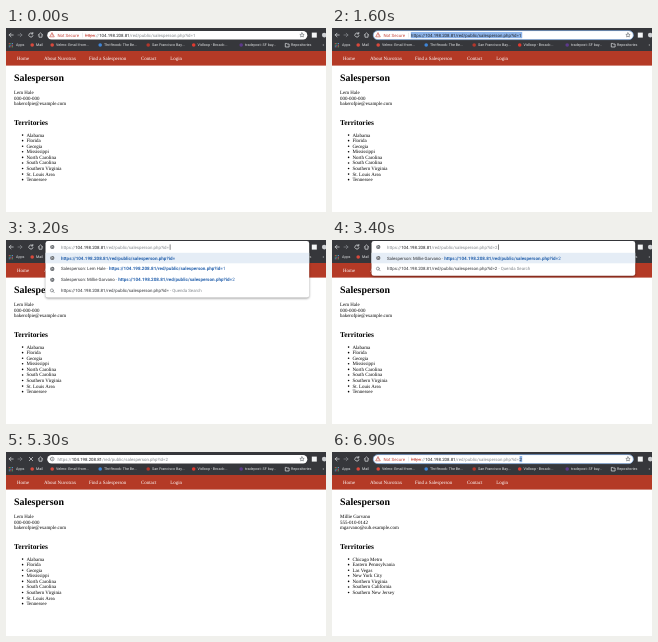
These frames come from a looping animation (320 by 184 pixels, 8 s). An HTML page:

```html
<!DOCTYPE html>
<html lang="en">
<head>
<meta charset="utf-8">
<title>Salesperson</title>
<style>
html, body { margin: 0; width: 100%; height: 100%; overflow: hidden; background: #fff; }
svg { display: block; width: 100vw; height: 100vh; text-rendering: geometricPrecision; }
.ui { font-family: Roboto, sans-serif; font-size: 4.37px; }
.marks { font-size: 3.7px; fill: #e2e4e6; }
.page { font-family: "Liberation Serif", serif; font-size: 4.95px; }
.page .h1 { font-size: 9.9px; font-weight: 700; }
.page .h2 { font-size: 7.42px; font-weight: 700; }
.icon { fill: none; stroke: #d6d8db; stroke-width: .75; stroke-linecap: round; stroke-linejoin: round; }
.dim { stroke: #808388; }
.dark { stroke: #5f6368; stroke-width: .6; }
.danger { stroke: #c5453a; stroke-width: .6; }

/* address colours */
.scheme, .rest { fill: #80868b; }
.host { fill: #202124; }
.warn .scheme, .alert { fill: #c5453a; }
.warn .scheme { text-decoration: line-through; }
.chosen tspan { fill: #202124; }
.row { fill: #303236; }
.row .note { fill: #80868b; }
.link { fill: #2662ad; font-weight: 700; font-size: 4.55px; }
.link .last { font-weight: 400; }
.panel { filter: drop-shadow(0 1px 1.2px rgba(0, 0, 0, .4)); }

/* timeline: 1% is 80 ms */
[class*="t-"] { animation: 8s step-end infinite; }
.t-first { animation-name: first; }
.t-wait { animation-name: wait; }
.t-second { animation-name: second; }
.t-ring { animation-name: ring; }
.t-all1 { animation-name: all1; }
.t-all2 { animation-name: all2; }
.t-digit { animation-name: digit; }
.t-caret { animation-name: caret; }
.t-drop1 { animation-name: drop1; }
.t-drop2 { animation-name: drop2; }
.t-blink { animation-name: blink; }
.t-page1 { animation-name: page1; }
.t-reload { animation-name: reload; }
@keyframes first { 0% { visibility: visible } 40%, 100% { visibility: hidden } }
@keyframes wait { 0% { visibility: hidden } 66.25% { visibility: visible } 70%, 100% { visibility: hidden } }
@keyframes second { 0% { visibility: hidden } 70%, 100% { visibility: visible } }
@keyframes ring { 0%, 40% { visibility: hidden } 20%, 82.5%, 100% { visibility: visible } }
@keyframes all1 { 0% { visibility: hidden } 20% { visibility: visible } 30%, 100% { visibility: hidden } }
@keyframes all2 { 0% { visibility: hidden } 82.5% { visibility: visible } 86.25%, 100% { visibility: hidden } }
@keyframes digit { 0% { visibility: hidden } 86.25%, 100% { visibility: visible } }
@keyframes caret { 0% { visibility: hidden } 30% { visibility: visible } 36.25%, 100% { visibility: hidden } }
@keyframes drop1 { 0% { visibility: hidden } 40% { visibility: visible } 42.5%, 100% { visibility: hidden } }
@keyframes drop2 { 0% { visibility: hidden } 42.5% { visibility: visible } 66.25%, 100% { visibility: hidden } }
@keyframes blink { 0%, 47.5%, 60%, 100% { visibility: hidden } 42.5%, 53.75% { visibility: visible } }
@keyframes page1 { 0% { visibility: visible } 70%, 100% { visibility: hidden } }
@keyframes reload { 0%, 70%, 100% { visibility: visible } 66.25% { visibility: hidden } }
</style>
</head>
<body>
<svg id="stage" viewBox="0 0 320 184" preserveAspectRatio="none"></svg>
<script>
const text = (x, y, s, cls = '') => `<text x="${x}" y="${y}" class="${cls}">${s}</text>`;
const box = (x, y, w, h, fill, extra = '') =>
  `<rect x="${x}" y="${y}" width="${w}" height="${h}" fill="${fill}" ${extra}/>`;
const dot = (x, y, r, fill) => `<circle cx="${x}" cy="${y}" r="${r}" fill="${fill}"/>`;
const path = (d, cls = '') => `<path class="icon ${cls}" d="${d}"/>`;
const group = (cls, ...parts) => `<g class="${cls}">${parts.join('')}</g>`;

const HOST = '104.198.208.81';
const PATH = '/red/public/salesperson.php?id=';
const SELECTION = '#8db4ea';
const url = id => `<tspan class="scheme">https</tspan><tspan class="rest">://</tspan>` +
  `<tspan class="host">${HOST}</tspan><tspan class="rest">${PATH}${id}</tspan>`;
const link = id => `<tspan class="link">https://${HOST}${PATH}<tspan class="last">${id}</tspan></tspan>`;

const people = [
  {
    name: 'Lem Hale', phone: '000-000-000', mail: 'bakerofpie@example.com',
    areas: ['Alabama', 'Florida', 'Georgia', 'Mississippi', 'North Carolina', 'South Carolina',
      'Southern Virginia', 'St. Louis Area', 'Tennessee']
  },
  {
    name: 'Millie Garvano', phone: '555-010-0142', mail: 'mgarvano@sub.example.com',
    areas: ['Chicago Metro', 'Eastern Pennsylvania', 'Las Vegas', 'New York City',
      'Northern Virginia', 'Southern California', 'Southern New Jersey']
  }
];

const LINE = 5.57;
const details = p =>
  [p.name, p.phone, p.mail].map((s, i) => text(8, 66.3 + i * LINE, s)).join('') +
  p.areas.map((s, i) => {
    const y = 108.6 + i * LINE;
    return dot(16.6, y - 1.5, .8, '#000') + text(20.4, y, s);
  }).join('');

const page = group('page',
  box(0, 23, 320, 14.6, '#b43a26'),
  `<g fill="#fff">`,
  [[11, 'Home'], [38, 'About Nuvotrax'], [83, 'Find a Salesperson'], [135, 'Contact'], [164.3, 'Login']]
    .map(([x, s]) => text(x, 32, s)).join(''),
  `</g>`,
  text(8, 53.1, 'Salesperson', 'h1'),
  text(8, 97, 'Territories', 'h2'),
  group('t-page1', details(people[0])),
  group('t-second', details(people[1])));

const marks = [
  [10, 'Apps', ''], [30, 'Mail', '#d9493c'], [50, 'Velmo: Email from...', '#d9493c'],
  [98, 'Thriftnook: The Be...', '#3f86d8'], [146, 'San Francisco Bay...', '#b3372c'],
  [191.5, 'Vidloop - Broadc...', '#e03a30'], [239, 'tradepost: SF bay...', '#5d3a8c']
];
const apps = [0, 1, 2].map(i => [0, 1, 2].map(j =>
  box(2.8 + i * 1.6, 15.1 + j * 1.6, 1, 1, ['#d9584b', '#58a869', '#5a8fe0'][(i + j) % 3])).join('')).join('');

const chrome = group('ui',
  box(0, 0, 320, 23, '#36373b'),
  path('M7.2 7H3.2M5 5.2 3.2 7 5 8.8'),
  path('M12 7h4M14.2 5.2 16 7 14.2 8.8', 'dim'),
  group('t-reload', path('M26.6 5.7A2.1 2.1 0 1 0 27 7.6M26.8 4.4v1.5h-1.5')),
  group('t-wait', path('M23.3 5.3 26.7 8.7M26.7 5.3 23.3 8.7')),
  path('M32.2 7.1 34.5 4.9 36.8 7.1M33 6.8V9.2h3V6.8'),
  box(41.3, 2.9, 260, 8.5, '#fff', 'rx="4.25"'),
  path('M296 4.9l.65 1.4 1.5.2-1.1 1 .3 1.5-1.35-.7-1.35.7.3-1.5-1.1-1 1.5-.2z', 'dark'),
  box(305.8, 4.6, 5, 5, '#f4f5f6'),
  dot(318.2, 7.1, 2.3, '#d0d2d5'),
  group('marks', apps,
    marks.map(([x, s, c]) => (c && dot(x - 3.8, 17, 1.8, c)) + text(x, 18.3, s)).join(''),
    path('M279.3 18.6v-3.2h1.3l.5.6h2v2.6z'),
    text(285, 18.3, 'Repositories'),
    text(316.5, 18.3, '»')));

const insecure = (time, id) => group(time,
  path('M46.2 4.9 48.3 8.8h-4.2zM46.2 6.4v.9', 'danger'),
  text(51.5, 8.5, 'Not Secure', 'alert'),
  box(76, 4.8, .35, 4.6, '#c4c7ca'),
  text(79, 8.5, url(id), 'warn'));

const selected = (time, id) => group(time,
  box(78.8, 4, 111.4, 6.2, SELECTION),
  text(79, 8.5, url(id), 'chosen'));

const caret = x => box(x, 4.4, .55, 5.4, '#202124');

const address = group('ui',
  insecure('t-first', 1),
  group('t-wait',
    path('M44.3 7a1.9 1.9 0 1 0 3.8 0a1.9 1.9 0 1 0-3.8 0M46.2 6.9V8M46.2 5.9v.01', 'dark'),
    text(51.5, 8.5, url(2))),
  insecure('t-second', 2),
  group('t-ring', box(41.3, 2.6, 260, 9, 'none', 'rx="4.5" stroke="#86b0e6" stroke-width=".7"')),
  selected('t-all1', 1),
  selected('t-all2', 2),
  group('t-digit', box(187.6, 4, 2.6, 6.2, SELECTION), text(187.6, 8.5, '2', 'row')),
  group('t-caret', caret(190)));

const globe = y => dot(46.3, y, 2.1, '#5f6368') +
  `<path d="M45 ${y - .9}q1.2-.5 1.5.3t-1.3 1M46.6 ${y + .9}l1-.8" fill="none" stroke="#fff" stroke-width=".5"/>`;
const lens = y => path(`M47 ${y + .7} 48.2 ${y + 1.9}M47.4 ${y - .3}a1.5 1.5 0 1 1-3 0a1.5 1.5 0 1 1 3 0`, 'dark');

const dropdown = (time, id, hits) => {
  const rows = [...hits, `https://${HOST}${PATH}${id} <tspan class="note">- Quenda Search</tspan>`];
  const height = 13 + rows.length * 10.9;
  return group('ui ' + time,
    box(39.5, 1, 263.7, height, '#fff', 'rx="2.4" class="panel"'),
    box(39.5, 12.8, 263.7, 10.5, '#e5edf6'),
    globe(7),
    text(55, 8.5, url(id)),
    rows.map((s, i) => {
      const y = 18 + i * 10.9;
      return (i < hits.length ? globe(y) : lens(y)) + text(55, y + 1.5, s, 'row');
    }).join(''));
};
const hit = (p, id) => `Salesperson: ${p.name} <tspan class="note">-</tspan> ${link(id)}`;

document.getElementById('stage').innerHTML = [
  box(0, 0, 320, 184, '#fff'), page, chrome, address,
  dropdown('t-drop1', '', [link(''), hit(people[0], 1), hit(people[1], 2)]),
  group('t-drop1', caret(163.8)),
  dropdown('t-drop2', 2, [hit(people[1], 2)]),
  group('t-blink', caret(166.1))
].join('');
</script>
</body>
</html>
```
